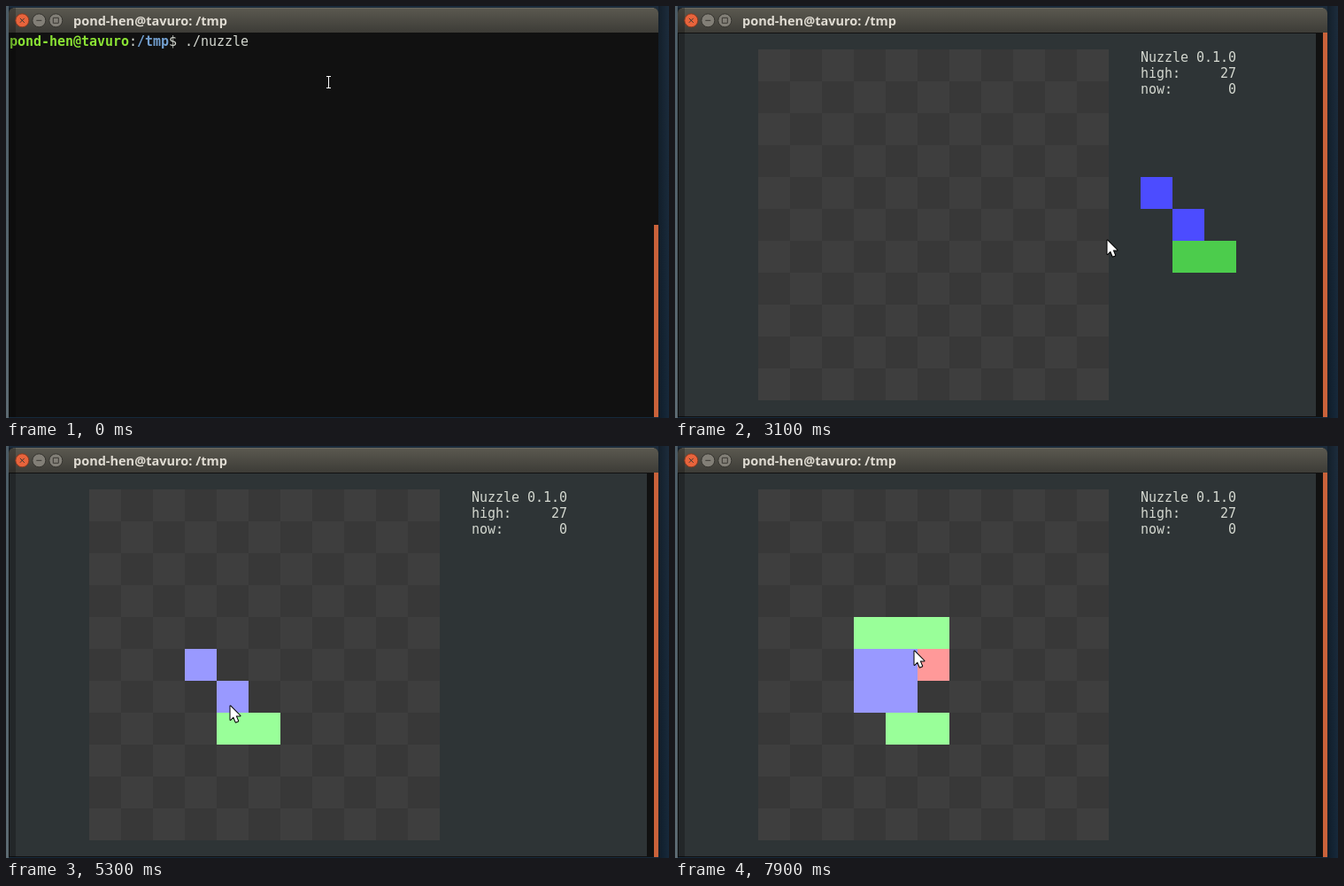
An HTML page with a canvas for the animation above (8000 ms loop, 749 px wide and 465 px high).

```html
<!DOCTYPE html>
<html>
<head>
<meta charset="utf-8">
<title>Nuzzle</title>
<style>
html, body { margin: 0; width: 100%; height: 100%; overflow: hidden; background: #1b2a38; }
canvas { display: block; }
</style>
</head>
<body>
<canvas id="stage" width="749" height="465"></canvas>
<script>
const ctx = document.getElementById('stage').getContext('2d');
const HOST = 'pond-hen@tavuro';
const FG = '#d3d7cf', BG = '#2e3436', BLACK = '#111111';
const COL = 9, ROW = 18, LEFT = 4, TOP = 31, CELL = 36;
const HOME = [526, 193];
const LAG = 60; // a dragged piece trails the pointer

const LOGO = [
  " _ __  _   _ _______| | ___",
  "| '_ \\| | | |_  /_  / |/ _ \\",
  "| | | | |_| |/ / / /| |  __/",
  "|_| |_|\\__,_/___/___|_|\\___|"
];

// [dark, light] shades: while dragged, once placed
const SHADES = {
  b: ['#4c4cff', '#9999ff'],
  g: ['#4ccc4c', '#99ff99'],
  r: ['#ff4c4c', '#ff9999']
};

// Each piece: shape, grip in character cells, and its times
const PIECES = [
  { rows: ['b..', '.b.', '.gg'], grip: [5, 3], show: 2600, grab: 4000, drop: 5300, end: [202, 229] },
  { rows: ['ggg', '.br', 'b..'], grip: [7, 2], show: 5500, grab: 6500, drop: 7900, end: [202, 193] }
];

// Pointer strokes between its resting places
const START = [366, 97];
const STROKES = [
  { from: 1000, to: 1900, x: 364, y: 282 },          // down to Exit
  { from: 1950, to: 2200, x: 363, y: 275 },          // back to New game
  { from: 3000, to: 3200, x: 529, y: 253 },
  { from: 3300, to: 3500, x: 578, y: 248 },          // first piece
  { from: 3965, to: 4900, x: 253, y: 293 },          // drag it
  { from: 5400, to: 6300, x: 591, y: 236 },          // second piece
  { from: 6350, to: 7300, x: 270, y: 231, lift: 9 }  // drag it
];

const easeOut = k => 1 - (1 - k) ** 2;
const smooth = k => k * k * (3 - 2 * k);

function pointer(t) {
  let [x, y] = START;
  for (const s of STROKES) {
    const k = Math.min(1, Math.max(0, (t - s.from) / (s.to - s.from)));
    x += (s.x - x) * easeOut(k);
    y += (s.y - y) * smooth(k) - (s.lift || 0) * Math.sin(Math.PI * k);
    if (k < 1) break;
  }
  return [x, y];
}

function rect(x, y, w, h, fill) {
  ctx.fillStyle = fill;
  ctx.fillRect(x, y, w, h);
}

function gradient(x0, y0, x1, y1, from, to) {
  const g = ctx.createLinearGradient(x0, y0, x1, y1);
  g.addColorStop(0, from);
  g.addColorStop(1, to);
  return g;
}

// Terminal text at a column and row, one character per cell
function print(text, col, row, fill = FG, weight = '') {
  ctx.font = weight + ' 15px "DejaVu Sans Mono", monospace';
  ctx.fillStyle = fill;
  [...text].forEach((c, i) => ctx.fillText(c, LEFT + (col + i) * COL, TOP + row * ROW + 14));
}

function button(x, fill, edge, icon) {
  ctx.save();
  ctx.translate(x, 16.3);
  ctx.beginPath();
  ctx.arc(0, 0, 7.5, 0, 7);
  ctx.fillStyle = fill;
  ctx.fill();
  ctx.lineWidth = 1;
  ctx.strokeStyle = edge;
  ctx.stroke();
  ctx.strokeStyle = '#3a3833';
  ctx.stroke(new Path2D(icon));
  ctx.restore();
}

function panel(h, fill) {
  ctx.beginPath();
  ctx.roundRect(3, 2, 734, h, [6, 6, 0, 0]);
  ctx.fillStyle = fill;
  ctx.fill();
}

function frameWindow() {
  rect(0, 0, 749, 465, gradient(0, 0, 0, 465, '#1c2c3c', '#16293b'));
  rect(737, 0, 12, 465, gradient(737, 0, 749, 0, 'rgba(0,0,0,.3)', 'rgba(0,0,0,0)'));
  rect(0, 0, 3, 465, gradient(0, 0, 0, 465, '#4b5b65', '#5c6a72'));
  panel(462, BLACK);
  panel(28, gradient(0, 2, 0, 30, '#5b5950', '#3d3c37'));
  rect(8, 2, 724, 1, '#6b695f');
  ctx.font = 'bold 14.5px "Open Sans", sans-serif';
  ctx.fillStyle = '#dfdbd2';
  ctx.fillText(HOST + ': /tmp', 76, 22);
}

function prompt(t) {
  print(HOST, 0, 0, '#8ae234', 'bold');
  print(':', 15, 0);
  print('/tmp', 16, 0, '#729fcf', 'bold');
  print('$ ./nuzzle', 20, 0);
  if (t < 500) {
    rect(362, 79, 5, 1, '#fff');
    rect(364, 80, 1, 12, '#fff');
    rect(362, 92, 5, 1, '#fff');
  }
}

function menu(t) {
  LOGO.forEach((line, i) => print(line, 26, 8 + i));
  const exit = t >= 1100 && pointer(t)[1] >= 280.5;
  rect(310, exit ? 283 : 265, 108, ROW, FG);
  print('New game', 36, 13, exit ? FG : BG);
  print('Exit', 38, 14, exit ? BG : FG);
}

function origin(piece, t) {
  if (t < piece.grab) return HOME;
  if (t >= piece.drop) return piece.end;
  const [x, y] = pointer(t - LAG);
  const snap = (v, start, size, grip) => start + size * (Math.floor((v - start) / size) - grip);
  return [snap(x, LEFT, COL, piece.grip[0]), snap(y, TOP, ROW, piece.grip[1])];
}

function game(t) {
  for (let r = 0; r < 11; r++)
    for (let c = 0; c < 11; c++)
      rect(94 + c * CELL, 49 + r * CELL, CELL, CELL, (r + c) % 2 ? '#383838' : '#3e3e3e');
  print('Nuzzle 0.1.0', 58, 1);
  print('high:     27', 58, 2);
  print('now:       0', 58, 3);
  for (const piece of PIECES) {
    if (t < piece.show) continue;
    const [x, y] = origin(piece, t);
    piece.rows.forEach((row, r) => [...row].forEach((k, c) => {
      if (k !== '.') rect(x + c * CELL, y + r * CELL, CELL, CELL, SHADES[k][+(t >= piece.drop)]);
    }));
  }
}

const ARROW = new Path2D('M.5 .5V16L4 12.6L6.6 18.6L9.2 17.5L6.7 11.6H11.5Z');
function arrow(t) {
  const [x, y] = pointer(t).map(Math.round);
  ctx.save();
  ctx.translate(x, y);
  ctx.lineWidth = 2;
  ctx.lineJoin = 'round';
  ctx.strokeStyle = '#000';
  ctx.stroke(ARROW);
  ctx.fillStyle = '#fff';
  ctx.fill(ARROW);
  ctx.restore();
}

function draw(now) {
  const t = Math.floor(now % 8000 / 100) * 100;
  const running = t >= 600;
  frameWindow();
  if (running) {
    rect(LEFT, TOP, 720, 432, BG);
    if (t < 2600) menu(t); else game(t);
  } else prompt(t);
  const bar = running ? 30 : 247;
  rect(732, bar, 5, 464 - bar, '#c9623a');
  rect(3, 2, 8, 462, 'rgba(0,0,0,.25)');
  button(18.3, '#e8643c', '#8a3a20', 'M-2.5 -2.5L2.5 2.5M2.5 -2.5L-2.5 2.5');
  button(37.3, '#827f77', '#35342f', 'M-3 0H3');
  button(56.3, '#827f77', '#35342f', 'M-3 -3H3V3H-3Z');
  if (t >= 1100) arrow(t);
  requestAnimationFrame(() => draw(performance.now()));
}
draw(0);
</script>
</body>
</html>
```
